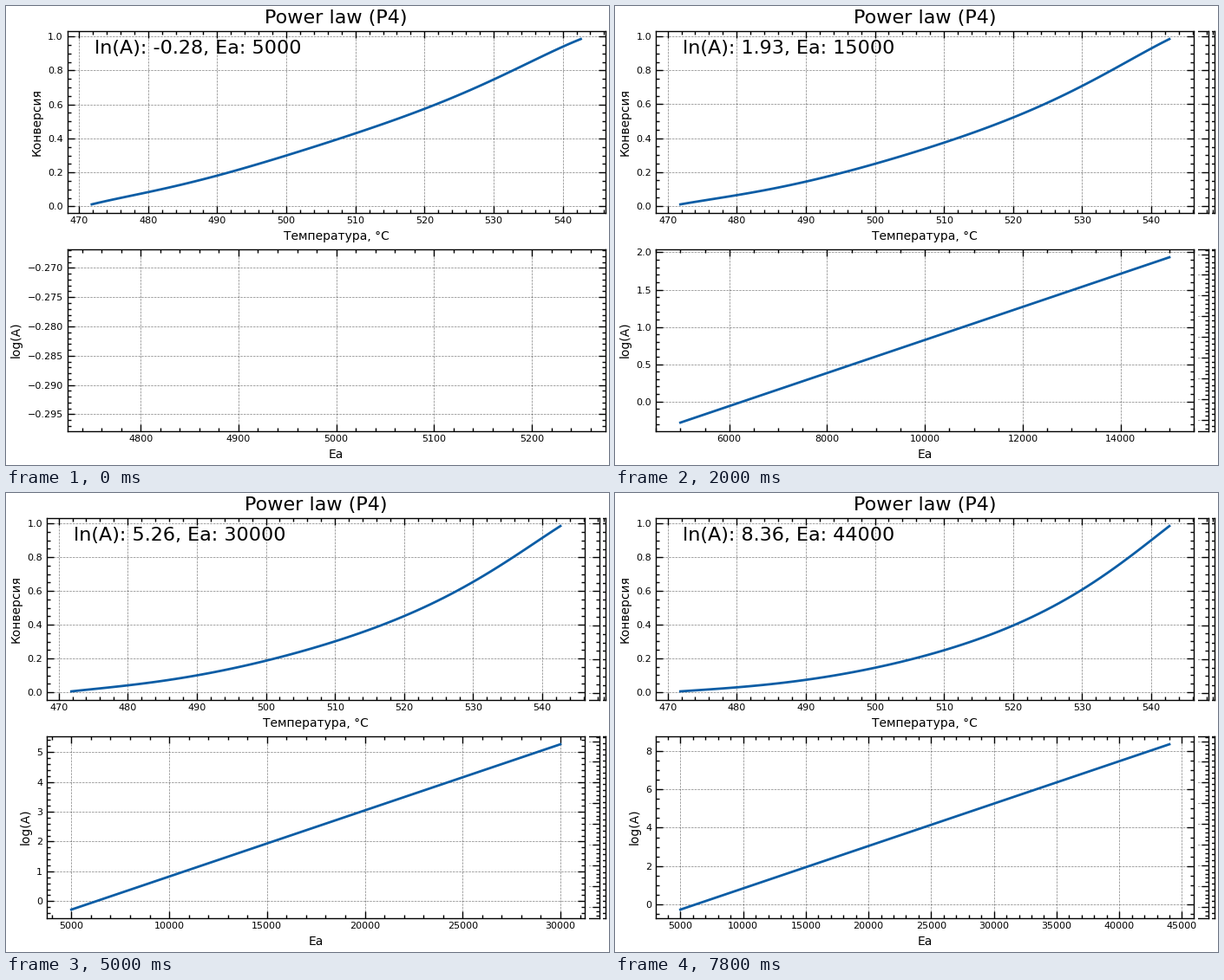
A matplotlib script for the animation above (8 s loop, 695 by 530 pixels).

```python
import numpy as np
import matplotlib.pyplot as plt
from matplotlib.animation import FuncAnimation
from matplotlib.ticker import AutoMinorLocator

W, H, DPI = 695, 530, 100
AX_W, AX_H, GAP, PAD = 620, 210, 42, 5
N, STEP_MS = 40, 200
R, T_END = 8.314, 542.62
BLUE = "#0C5DA5"

plt.rcParams.update({
    "font.family": "DejaVu Sans",
    "font.size": 10,
    "axes.titlesize": 16,
    "axes.linewidth": 1,
    "axes.axisbelow": True,
    "axes.grid": True,
    "grid.color": "k",
    "grid.linestyle": "--",
    "grid.alpha": 0.5,
    "grid.linewidth": 0.5,
    "lines.linewidth": 2,
})
for axis, far_side in (("xtick", "top"), ("ytick", "right")):
    plt.rcParams.update({
        f"{axis}.{far_side}": True,
        f"{axis}.direction": "in",
        f"{axis}.labelsize": 8,
        f"{axis}.major.size": 6,
        f"{axis}.major.width": 1,
        f"{axis}.minor.size": 3,
        f"{axis}.minor.width": 1,
        f"{axis}.minor.visible": True,
    })

# Conversion at the lowest activation energy, smoothed through a few readings
knots_t = np.array([471.85, 480, 490, 500, 510, 520, 530, 540, T_END])
knots_a = np.array([0.012, 0.084, 0.181, 0.300, 0.429, 0.575, 0.746, 0.940, 0.985])
weights = np.array([6, 1, 1, 1, 1, 1, 1, 1, 6])
fit = np.polyfit((knots_t - 507) / 36, knots_a, 6, w=weights)
temp = np.linspace(knots_t[0], T_END, 72)
base = np.polyval(fit, (temp - 507) / 36)

energy = 5000 + 1000 * np.arange(N)
log_a = -0.2823 + 0.22165 * np.arange(N)


def conversion(ea):
    return base * np.exp(-(ea - energy[0]) / R * (1 / temp - 1 / T_END))


fig = plt.figure(figsize=(W / DPI, H / DPI), dpi=DPI, facecolor="white")


def add_axes(xlabel, ylabel):
    ax = fig.add_axes([0.1, 0.1, 0.8, 0.4], label=ylabel)
    ax.set_xlabel(xlabel)
    ax.set_ylabel(ylabel)
    ax.xaxis.set_minor_locator(AutoMinorLocator())
    ax.yaxis.set_minor_locator(AutoMinorLocator())
    line, = ax.plot([], [], color=BLUE)
    return ax, line


top, curve = add_axes("Температура, °C", "Конверсия")
low, trend = add_axes("Ea", "log(A)")
top.set_title("Power law (P4)")
note = top.text(0.05, 0.95, "", transform=top.transAxes, va="top", fontsize=16)

# What earlier, wider pages leave visible past the right edge of the page
margin = fig.figimage(np.full((H, 1, 4), 255, np.uint8), zorder=10, origin="upper")
margin.set_in_layout(False)
margin.set_visible(False)


def place(left, bottom):
    for ax, y in ((low, bottom), (top, bottom + AX_H + GAP)):
        ax.set_position([left / W, y / H, AX_W / W, AX_H / H])


def layout(k):
    """Set the data of step k, fit the page to its labels, return its width."""
    curve.set_data(temp, conversion(energy[k]))
    trend.set_data(energy[:k + 1], log_a[:k + 1])
    for ax in (top, low):
        ax.relim()
        ax.autoscale_view()
    note.set_text(f"ln(A): {log_a[k]:.2f}, Ea: {energy[k]}")
    left, bottom = 71, 39
    place(left, bottom)
    box = fig.get_tightbbox()
    left += PAD - box.x0 * DPI
    bottom += PAD - box.y0 * DPI
    place(left, bottom)
    return min(W, int(left + AX_W + PAD))


def show(k):
    width = layout(k)
    visible = leftovers[k] is not None and width < W
    margin.set_visible(visible)
    if visible:
        margin.set_data(leftovers[k][:, width:])
        margin.ox = width
    return curve, trend, note, margin


widths = [layout(k) for k in range(N)]
leftovers = [None]
for k in range(N - 1):
    page = leftovers[k]
    if widths[k + 1] < widths[k]:
        show(k)
        fig.canvas.draw()
        page = np.array(fig.canvas.buffer_rgba())
    leftovers.append(page)

anim = FuncAnimation(fig, show, frames=N, init_func=lambda: show(0),
                     interval=STEP_MS, repeat=True, repeat_delay=0, blit=False)
plt.show()
```
